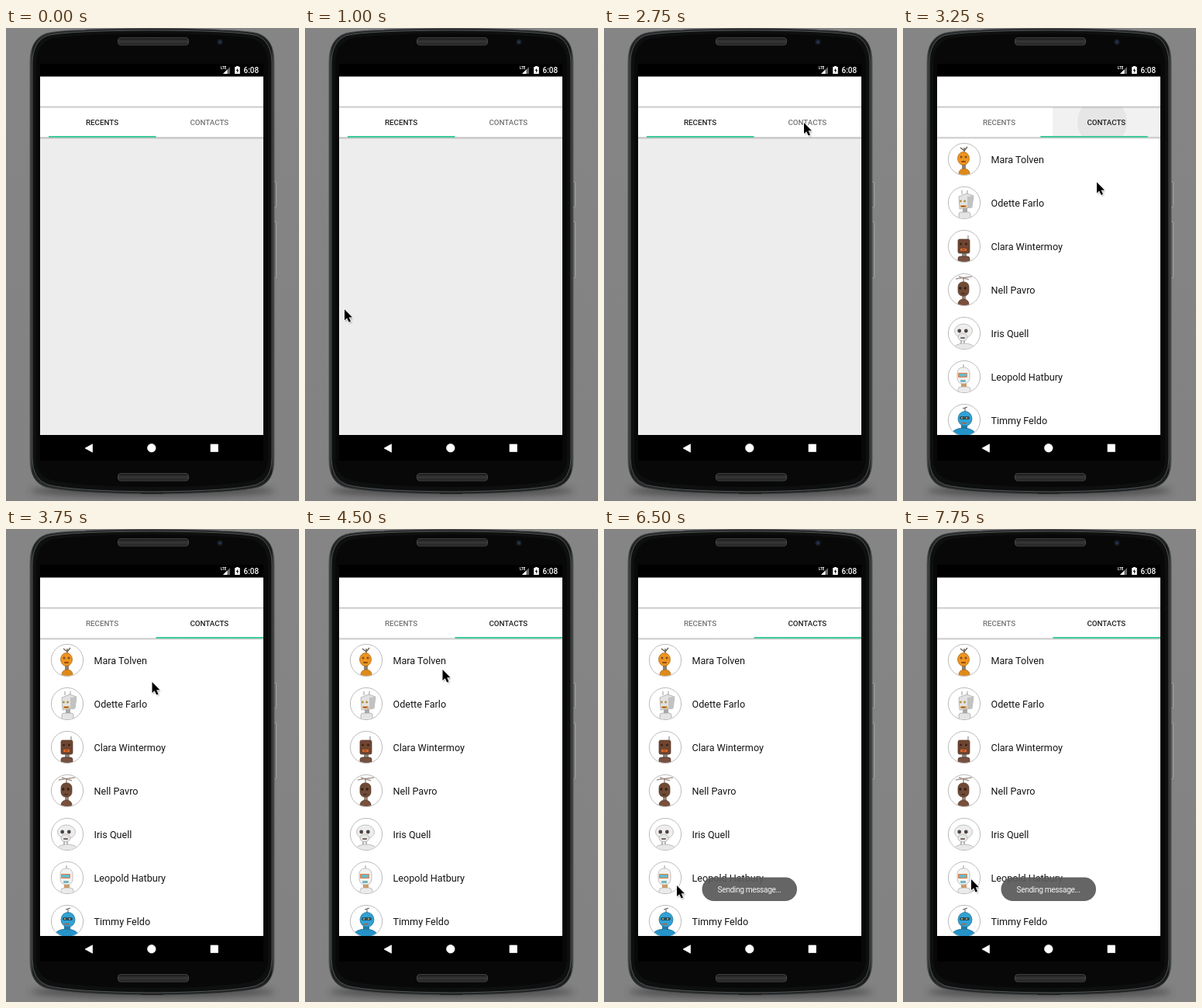
An HTML page for the animation above (8000 ms loop, 378 by 609 pixels).

```html
<!DOCTYPE html>
<html lang="en">
<head>
<meta charset="utf-8">
<title>Contacts tab</title>
<style>
html, body { margin: 0; width: 100%; height: 100%; overflow: hidden; background: #838383; }
svg { display: block; width: 100vw; height: 100vh; }
text { font-family: Roboto, "Open Sans", sans-serif; }
.tab { font-size: 9.8px; font-weight: 500; text-anchor: middle; }
.name { font-size: 12.6px; fill: #151515; }
.note { font-size: 10.2px; letter-spacing: -.38px; fill: #f4f4f4; text-anchor: middle; }
</style>
</head>
<body>
<svg viewBox="0 0 378 609">
  <defs>
    <linearGradient id="wall" x2="0" y2="1">
      <stop offset="0" stop-color="#858585"/><stop offset="1" stop-color="#828282"/>
    </linearGradient>
    <linearGradient id="rim">
      <stop offset="0" stop-color="#4a4d4f"/><stop offset=".012" stop-color="#1d1f20"/>
      <stop offset=".04" stop-color="#282a2b"/><stop offset=".96" stop-color="#202122"/>
      <stop offset=".988" stop-color="#161717"/><stop offset="1" stop-color="#505355"/>
    </linearGradient>
    <linearGradient id="shade" x2="0" y2="1">
      <stop offset="0" stop-color="#000" stop-opacity=".28"/><stop offset="1" stop-color="#000" stop-opacity="0"/>
    </linearGradient>
    <linearGradient id="grille" x2="0" y2="1">
      <stop offset="0" stop-color="#161616"/><stop offset=".5" stop-color="#373737"/><stop offset="1" stop-color="#202020"/>
    </linearGradient>
    <filter id="soft" x="-20%" y="-200%" width="140%" height="500%"><feGaussianBlur stdDeviation="4"/></filter>
    <filter id="blur" x="-50%" y="-50%" width="200%" height="200%"><feGaussianBlur stdDeviation="1"/></filter>
    <clipPath id="page"><rect x="44" y="141" width="288" height="383"/></clipPath>
    <clipPath id="tabBox"><rect x="193" y="102" width="139" height="39"/></clipPath>
    <clipPath id="disc"><circle r="20"/></clipPath>
  </defs>

  <rect width="378" height="609" fill="url(#wall)"/>
  <ellipse cx="189" cy="596" rx="158" ry="8" fill="#333" opacity=".6" filter="url(#soft)"/>

  <g id="phone">
    <g fill="#707070" stroke="#b4b4b4" stroke-width=".8">
      <rect x="345.500" y="198.500" width="3.200" height="32" rx="1"/>
      <rect x="345.500" y="249.500" width="3.200" height="72" rx="1"/>
    </g>
    <path d="M31 44Q31 14 52 7Q74 1 189 .5Q303 1 325 7Q346 14 346 44V556Q346 584 326 591Q296 599 189 600Q81 599 51 591Q31 584 31 556Z" fill="url(#rim)" stroke="#4a4d4e" stroke-width=".8"/>
    <path d="M34 46Q34 17 54 9.500Q80 3.500 189 3Q297 3.500 323 9.500Q343 17 343 46V554Q343 581 323 588Q293 596 189 597Q84 596 54 588Q34 581 34 554Z" fill="#0e0f0f" stroke="#505355" stroke-width="1"/>
    <path d="M39 48Q39 21 58 14Q86 8 189 7Q291 8 319 14Q338 21 338 48V552Q338 576 319 582Q290 590 189 591Q87 590 58 582Q39 576 39 552Z" fill="#080808"/>
    <rect x="44" y="46" width="288" height="511"/>
    <g fill="url(#grille)" stroke="#3f4143" stroke-width="1.200">
      <rect x="144.500" y="12.500" width="91" height="9.500" rx="4"/>
      <rect x="144.500" y="573.500" width="91" height="9.500" rx="4"/>
    </g>
    <circle cx="276" cy="18" r="3.800" fill="#16191f"/>
    <circle cx="276" cy="18" r="1.900" fill="#263451"/>
    <path d="M174 599h29" stroke="#222" stroke-width="2"/>
    <path d="M82 2h20M276 2h20" stroke="#77797a" stroke-width="1"/>
  </g>

  <g id="status" fill="#fff">
    <text x="277" y="53" font-size="4.500" font-weight="700">LTE</text>
    <path d="M289 50V59H280Z" fill="#666"/>
    <path d="M285.500 53.500V59H280Z"/>
    <path d="M297 49h3v1h1.800v9H295.200V50H297Z"/>
    <path d="M299.300 51.500L296.800 55h1.500l-.5 3 2.500-3.800h-1.500Z" fill="#000"/>
    <text x="306.500" y="58" font-size="10" font-weight="500">6:08</text>
  </g>

  <rect id="sheet" x="44" y="140" width="288" height="384"/>
  <g id="list" clip-path="url(#page)"></g>
  <g id="bar">
    <rect x="44" y="62.500" width="288" height="78.500" fill="#fff"/>
    <g id="ripple" clip-path="url(#tabBox)">
      <rect x="193" y="102" width="139" height="39" fill="#f1f1f1"/>
      <circle id="wave" cx="257" cy="121" fill="#e6e6e6"/>
    </g>
    <rect x="44" y="100.800" width="288" height="3" fill="url(#shade)"/>
    <rect x="44" y="140.500" width="288" height="3" fill="url(#shade)"/>
    <text id="recents" class="tab" x="124" y="125">RECENTS</text>
    <text id="contacts" class="tab" x="262.300" y="125">CONTACTS</text>
    <rect id="line" y="139" width="138.500" height="2" fill="#3fcb9c"/>
  </g>

  <g id="nav" fill="#fff" stroke="#fff" stroke-width=".7" stroke-linejoin="round">
    <path d="M102 541L111.500 535.800V546.200Z"/>
    <circle cx="187.800" cy="540.700" r="5.300"/>
    <rect x="264" y="536" width="9.500" height="9.500"/>
  </g>

  <g id="toast">
    <rect x="126.500" y="448.500" width="122.500" height="30.500" rx="15.250" fill="#5a5a5a" opacity=".93"/>
    <text class="note" x="187.500" y="467.500">Sending message...</text>
  </g>

  <g id="cursor">
    <path d="M1 2v14l3.300-3 2.500 5 2.500-1-2-5h4Z" opacity=".35" filter="url(#blur)"/>
    <path d="M0 0V14L3.200 11.200 5.700 16.500 8 15.400 5.700 10.300H10Z" stroke="#fff" stroke-width="1.400" paint-order="stroke"/>
  </g>
</svg>
<script>
const LOOP = 8000, STEP = 250, ROW = 56;
const $ = id => document.getElementById(id);
const set = (id, attrs) => { for (const k in attrs) $(id).setAttribute(k, attrs[k]); };

const rect = (x, y, w, h, fill, r = 1) => `<rect x="${x}" y="${y}" width="${w}" height="${h}" rx="${r}" fill="${fill}"/>`;
const oval = (x, y, rx, ry, fill) => `<ellipse cx="${x}" cy="${y}" rx="${rx}" ry="${ry}" fill="${fill}"/>`;
const wire = (d, color, w = 1) => `<path d="${d}" fill="none" stroke="${color}" stroke-width="${w}"/>`;
const edged = (shape, color) => `<g stroke="${color}" stroke-width=".7">${shape}</g>`;
const eyes = (x, y, gap, r, fill) => oval(x - gap, y, r, r, fill) + oval(x + gap, y, r, r, fill);

const people = [
  ["Mara Tolven",
    wire("M0-9V-15M0-11L-5-15M0-11L4-16", "#665c50", 1.3) + rect(-3, 5, 5, 8, "#8a837a") +
    edged(oval(0, 18, 7, 6, "#dd8a1c") + oval(-1, -1, 7.5, 8.5, "#ef9420"), "#a8640f") +
    eyes(-1, -3, 3, 1.5, "#76512a") + rect(-4, 2, 6, 2, "#8d4d0d")],
  ["Odette Farlo",
    wire("M-3-11V-16M4-9V-16", "#999") + rect(-2, 6, 6, 8, "#aaa") +
    edged(rect(-7, 12, 15, 9, "#e4e4e4", 3) + '<path d="M-7-8L3-12 12-9 10 6-6 8Z" fill="#e2e2e2"/>', "#a0a0a0") +
    '<path d="M4-8L12-9 10 6 4 7Z" fill="#c2c2c2"/>' +
    eyes(-2, -2, 2.6, 1.4, "#b18a35") + rect(-5, 3, 8, 3, "#d1a04c") + rect(-4, 4, 5, 1.2, "#a6452c")],
  ["Clara Wintermoy",
    wire("M5-9V-14", "#777") + rect(-3, 8, 6, 6, "#8a8580") +
    edged(rect(-8, 13, 15, 9, "#765041", 3) + rect(-8, -9, 15, 18, "#704530", 2), "#4e3428") +
    eyes(-1, -3, 3.5, 1.6, "#38241c") + rect(-5, 3, 8, 3, "#e46d27") + rect(-3, 4, 4, 1, "#88321a")],
  ["Nell Pavro",
    wire("M-11-14L10-17M-7-17L6-13", "#a99a93", 1.4) + wire("M-1-9V-16", "#715446") + rect(-3, 7, 5, 7, "#a28c7e") +
    edged(oval(-1, 18, 7, 6, "#78503c") + rect(-8, -10, 14, 18, "#704a35", 6), "#543a2a") +
    eyes(-2, -2, 3.2, 1.7, "#2d2019") + rect(-4, 4, 5, 1.5, "#402b20")],
  ["Iris Quell",
    wire("M-4 8V15M0 8V15", "#8e8e8e", 1.3) +
    edged(oval(0, 19, 13, 6, "#e8e8e8") + oval(-1, -3, 11.5, 9, "#eee") + oval(-2, 5, 6, 5, "#e6e6e6"), "#aaa") +
    eyes(-2, -3, 4.3, 2.4, "#4e4441") + rect(-5, 5, 6, 2, "#776a65")],
  ["Leopold Hatbury",
    wire("M-1-11V-16", "#999") + rect(-4, 8, 7, 6, "#d19a61") +
    edged(rect(-8, 13, 16, 9, "#ebebeb", 4) + rect(-9, -12, 16, 21, "#f2f2f2", 7), "#aaa") +
    rect(-8, -5, 12, 6, "#e87c3c") + rect(-7, -4, 10, 4, "#68b9ca") + rect(-5, 4, 7, 3, "#72b5bf")],
  ["Timmy Feldo",
    wire("M1-10V-16M-2-15L4-17", "#555") + rect(-4, 5, 8, 8, "#277ca6") +
    edged(oval(-1, 18, 15, 8, "#2693c8") + oval(1, -2, 9, 9.5, "#31a2d4"), "#17658d") +
    rect(-6, -5, 13, 4, "#275064", 2) + eyes(0, -3, 3, 1, "#d6b36c") + rect(-4, 3, 7, 1.6, "#b55c36")]
];

$("list").innerHTML = people.map(([name, bot], i) => {
  const y = 169 + i * ROW;
  return `<g transform="translate(79 ${y})"><circle r="20.600" fill="#fff" stroke="#bcbcbc"/>` +
    `<g clip-path="url(#disc)">${bot}</g></g><text class="name" x="113.500" y="${y + 5}">${name}</text>`;
}).join("");

// Pointer path: time, x, y
const path = [
  [250, 30, 585], [1250, 58, 288], [1750, 149.500, 267], [2500, 256, 156], [2750, 258, 122],
  [3000, 257, 122], [3250, 250, 198.500], [3750, 188.500, 197], [4500, 177.500, 181], [5750, 177.500, 181],
  [6250, 130, 350], [6500, 94, 459], [6750, 88, 451]
];

function pointAt(t) {
  const i = path.findIndex(p => p[0] >= t);
  if (i < 0) return path[path.length - 1].slice(1);
  if (i === 0) return path[0].slice(1);
  const a = path[i - 1], b = path[i], k = (t - a[0]) / (b[0] - a[0]);
  return [a[1] + (b[1] - a[1]) * k, a[2] + (b[2] - a[2]) * k];
}

const clamp = v => Math.max(0, Math.min(1, v));
const easeOut = v => 1 - (1 - clamp(v)) ** 2;

function draw(time) {
  const t = Math.floor(time % LOOP / STEP) * STEP;
  const open = t >= 3250;
  set("sheet", { fill: open ? "#fff" : "#ededed" });
  set("list", { visibility: open ? "visible" : "hidden" });
  set("recents", { fill: open ? "#757575" : "#202020" });
  set("contacts", { fill: open ? "#202020" : "#757575" });
  set("line", { x: 55 + 138.500 * easeOut((t - 3000) / 380) });
  set("ripple", { opacity: t < 3000 ? 0 : clamp((3750 - t) / 500) });
  set("wave", { r: 32 * clamp((t - 2850) / 400) });
  set("toast", { opacity: t < 5000 ? 0 : clamp((t - 4850) / 300) });
  set("cursor", {
    visibility: t < 250 ? "hidden" : "visible",
    transform: `translate(${pointAt(t)})`
  });
}

function tick() {
  draw(performance.now());
  requestAnimationFrame(tick);
}
tick();
</script>
</body>
</html>
```
